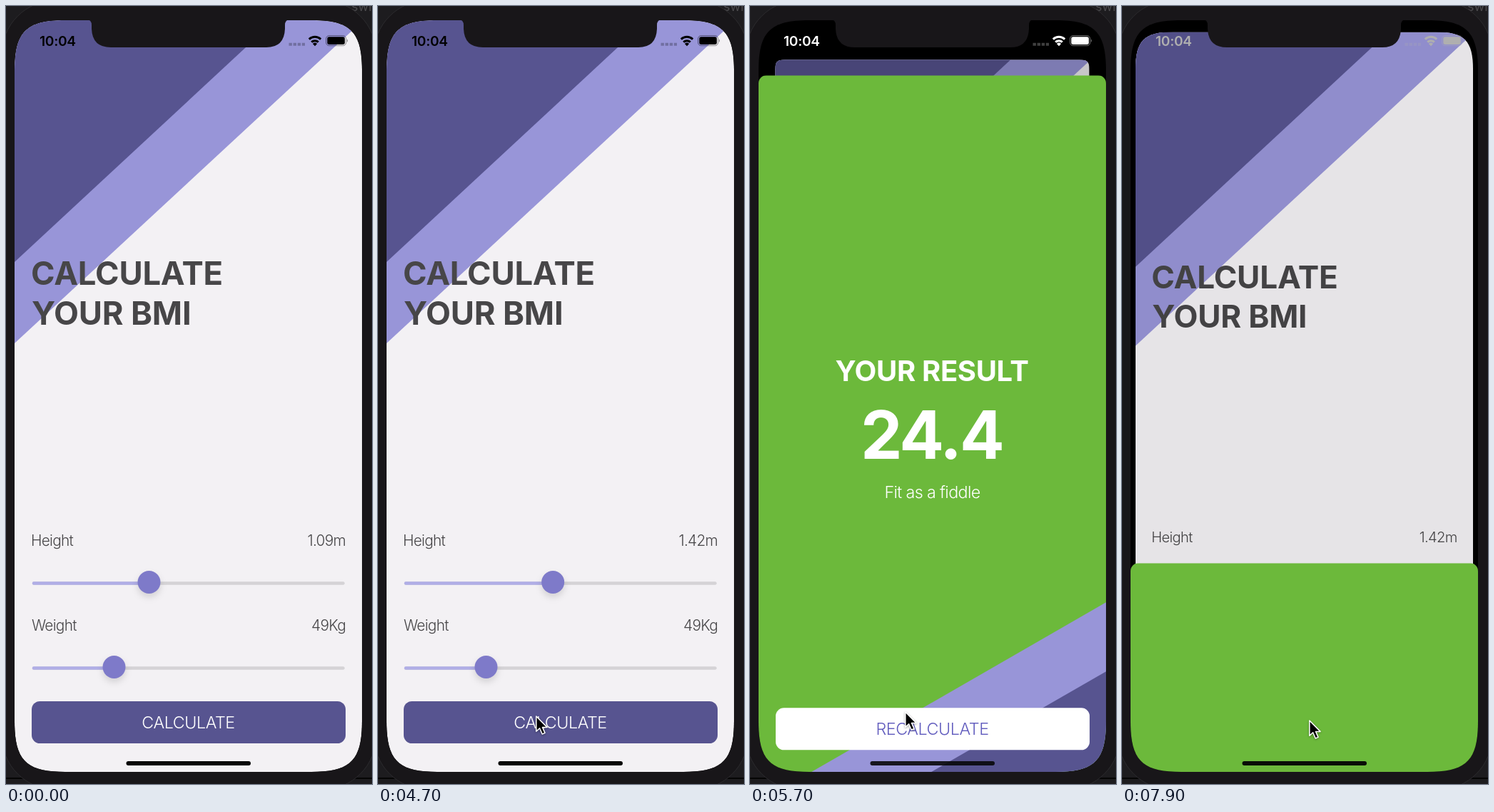
These frames come from a looping animation (513 by 1091 pixels, 8 s). An HTML page:

```html
<!DOCTYPE html>
<html lang="en">
<head>
<meta charset="utf-8">
<title>BMI calculator</title>
<style>
  html, body { margin: 0; width: 100%; height: 100%; overflow: hidden; background: #1b1a1c; }
  svg { display: block; width: 513px; height: 1091px; }
  text { font-family: Inter, Roboto, sans-serif; font-optical-sizing: none; white-space: pre; }
  .title { font-size: 45.4px; font-weight: 700; letter-spacing: -.2px; fill: #474648; }
  .label { font-size: 20.8px; font-weight: 300; letter-spacing: -.7px; fill: #474648; }
  .action { font-size: 23.3px; font-weight: 350; letter-spacing: -.45px; fill: #fff; }
  .time { font-size: 19.2px; font-weight: 600; letter-spacing: -.3px; }
  .end { text-anchor: end; }
  .mid { text-anchor: middle; }
  .heading { font-size: 40px; font-weight: 700; letter-spacing: -.35px; fill: #fff; }
  .result { font-size: 93px; font-weight: 700; letter-spacing: -3px; fill: #fff; }
  .advice { font-size: 23.3px; font-weight: 300; letter-spacing: -.65px; fill: #fff; }
  .knob { filter: drop-shadow(0 5px 5px rgba(0, 0, 0, .13)); }
  #cursor { filter: drop-shadow(0 1px 1.5px rgba(0, 0, 0, .35)); }
</style>
</head>
<body>
<svg viewBox="0 0 513 1091">
  <defs>
    <clipPath id="screen"><path id="screenShape"/></clipPath>
    <clipPath id="card"><path id="cardShape"/></clipPath>
    <clipPath id="sheetShape"><rect x="12" y="88" width="487" height="1100" rx="11"/></clipPath>
  </defs>

  <rect width="513" height="1091" fill="#1d1c1f"/>
  <text x="484" y="7" font-size="18" fill="#4b4a4d">swift</text>
  <path d="M0 1083H513" stroke="#050505" stroke-width="2"/>
  <rect x="-6" y="-8" width="525" height="1107" rx="76" fill="#181619" stroke="#2c2b2e"/>

  <g clip-path="url(#screen)">
    <rect x="12" y="20" width="487" height="1054"/>

    <g id="main">
      <g clip-path="url(#card)">
        <rect x="12" y="20" width="487" height="1054" fill="#f3f1f4"/>
        <path d="M12 20H501L12 473Z" fill="#9895d8"/>
        <path d="M12 20H377L12 359Z" fill="#575490"/>
        <text class="title" x="35" y="390.5">CALCULATE</text>
        <text class="title" x="36" y="446.5">YOUR BMI</text>

        <text class="label" x="35" y="756.5">Height</text>
        <text class="label end" x="476" y="756.5" id="height"></text>
        <path d="M39 809.5H472.5" stroke="#d5d3d6" stroke-width="4.5" stroke-linecap="round"/>
        <path id="heightFill" stroke="#b0aee6" stroke-width="4.5" stroke-linecap="round"/>
        <circle class="knob" id="heightKnob" cy="808" r="16" fill="#7e7ac9"/>

        <text class="label" x="36" y="875.5">Weight</text>
        <text class="label end" x="476" y="875.5">49Kg</text>
        <path d="M39 928.5H472.5" stroke="#d5d3d6" stroke-width="4.5" stroke-linecap="round"/>
        <path d="M39 928.5H152" stroke="#b0aee6" stroke-width="4.5" stroke-linecap="round"/>
        <circle class="knob" cx="151.5" cy="927" r="16" fill="#7e7ac9"/>

        <rect x="36" y="975" width="440" height="59" rx="11.5" fill="#575490"/>
        <text class="action mid" x="255.5" y="1013">CALCULATE</text>
        <rect id="dim" x="12" y="20" width="487" height="1054"/>
      </g>
    </g>

    <g id="sheet">
      <g clip-path="url(#sheetShape)">
        <rect x="12" y="88" width="487" height="1100" fill="#6cb93b"/>
        <path d="M499 827L70 1074H499Z" fill="#9895d8"/>
        <path d="M499 924L238 1074H499Z" fill="#575490"/>
        <text class="heading mid" x="255" y="516.5">YOUR RESULT</text>
        <text class="result mid" x="254.5" y="625.7">24.4</text>
        <text class="advice mid" x="255.5" y="680.5">Fit as a fiddle</text>
        <rect x="36" y="975" width="440" height="59" rx="11.5" fill="#fff"/>
        <text class="action mid" x="255.5" y="1013" style="fill:#625dbe">RECALCULATE</text>
      </g>
    </g>
  </g>

  <path d="M113 19Q120 19 120 27V32Q121 58 147 58H365Q390 58 391 32V27Q391 19 398 19Z" fill="#181619"/>

  <g id="status">
    <text class="time" x="47" y="55.5">10:04</text>
    <path d="M396.5 53.7H419" stroke="currentColor" stroke-width="4" stroke-dasharray="4.4 1.7" opacity=".25"/>
    <g fill="none" stroke="currentColor" stroke-width="3">
      <path d="M424.8 46.6A12 12 0 0 1 441.2 46.6"/>
      <path d="M428.2 50.6A7 7 0 0 1 437.8 50.6"/>
    </g>
    <path d="M433 56.2L429.9 53A4.5 4.5 0 0 1 436.1 53Z" fill="currentColor"/>
    <rect x="448.6" y="41.6" width="28" height="14" rx="4.2" fill="none" stroke="currentColor" opacity=".45"/>
    <rect x="450.3" y="43.3" width="24.6" height="10.6" rx="2.6" fill="currentColor"/>
    <path d="M478 46.3Q480 48.6 478 51Z" fill="currentColor" opacity=".5"/>
  </g>

  <rect id="home" x="168.5" y="1059" width="174.5" height="6" rx="3" fill="#060606"/>

  <path id="cursor" d="M.8 1V22.2L5.6 17.7L9.2 26L13 24.4L9.5 16.4H16Z"
        fill="#000" stroke="#fff" stroke-width="1.5" stroke-linejoin="round"/>
</svg>

<script>
const LOOP = 8000, STEP = 100;
const OPEN = 5333, CLOSE = 7765.6;
const $ = id => document.getElementById(id);
const smooth = k => k * k * (3 - 2 * k);
const clamp = k => Math.min(1, Math.max(0, k));

// Keys are [time, ...values], eased between neighbours.
const heightKeys = [[0, 1.09], [1100, 1.09], [2300, .48], [3500, .48], [4200, 1.42]];
const cursorKeys = [
  [0, 517, 838], [900, 200, 806], [1100, 200, 806], [2300, 117, 806],
  [2900, 308, 811], [3100, 308, 811], [3500, 117, 808], [4200, 244, 808],
  [4600, 221, 995], [4800, 221, 995], [5300, 217, 989], [6300, 217, 989],
  [6900, 263, 979], [7200, 263, 979], [7700, 262, 1001]
];

function track(keys, t) {
  const i = keys.findIndex(k => k[0] > t);
  if (i < 0) return keys[keys.length - 1].slice(1);
  const a = keys[i - 1], b = keys[i];
  const k = smooth((t - a[0]) / (b[0] - a[0]));
  return a.slice(1).map((v, j) => v + (b[j + 1] - v) * k);
}

// Critically damped spring, 0 to 1.
function spring(ms) {
  if (ms <= 0) return 0;
  const u = ms * .01826;
  return 1 - (1 + u) * Math.exp(-u);
}

// Screen outline with continuous corners that begin d before each end.
function outline(d) {
  const l = 12, t = 20, r = 499, b = 1074, c = d * .226;
  return `M${l} ${t + d}C${l} ${t + c} ${l + c} ${t} ${l + d} ${t}` +
    `H${r - d}C${r - c} ${t} ${r} ${t + c} ${r} ${t + d}` +
    `V${b - d}C${r} ${b - c} ${r - c} ${b} ${r - d} ${b}` +
    `H${l + d}C${l + c} ${b} ${l} ${b - c} ${l} ${b - d}Z`;
}

function draw(t) {
  const [height] = track(heightKeys, t);
  const knob = 53 + height / 3 * 406;
  $('height').textContent = height.toFixed(2) + 'm';
  $('heightKnob').setAttribute('cx', knob);
  $('heightFill').setAttribute('d', `M39 809.5H${knob}`);

  const p = spring(t - OPEN) - spring(t - CLOSE);
  const scale = 1 - .0965 * p;
  $('main').setAttribute('transform',
    `translate(255.5 ${547 + 5 * p}) scale(${scale}) translate(-255.5 -547)`);
  $('cardShape').setAttribute('d', outline(71 - 56 * p));
  $('dim').setAttribute('opacity', .18 * p);
  $('home').setAttribute('opacity', 1 - .12 * p);
  $('sheet').setAttribute('transform', `translate(0 ${986 * (1 - p)})`);
  $('sheet').style.display = p > 0 ? '' : 'none';

  const fade = at => smooth(clamp((t - at) / 360));
  const tone = Math.round(255 * (fade(OPEN) - fade(CLOSE)));
  const ink = `rgb(${tone},${tone},${tone})`;
  $('status').style.color = ink;
  $('status').style.fill = ink;

  const [x, y] = track(cursorKeys, t);
  $('cursor').setAttribute('transform', `translate(${x} ${y})`);
}

function tick() {
  const t = performance.now() % LOOP;
  draw(Math.floor(t / STEP) * STEP);
  requestAnimationFrame(tick);
}

$('screenShape').setAttribute('d', outline(71));
tick();
</script>
</body>
</html>
```
